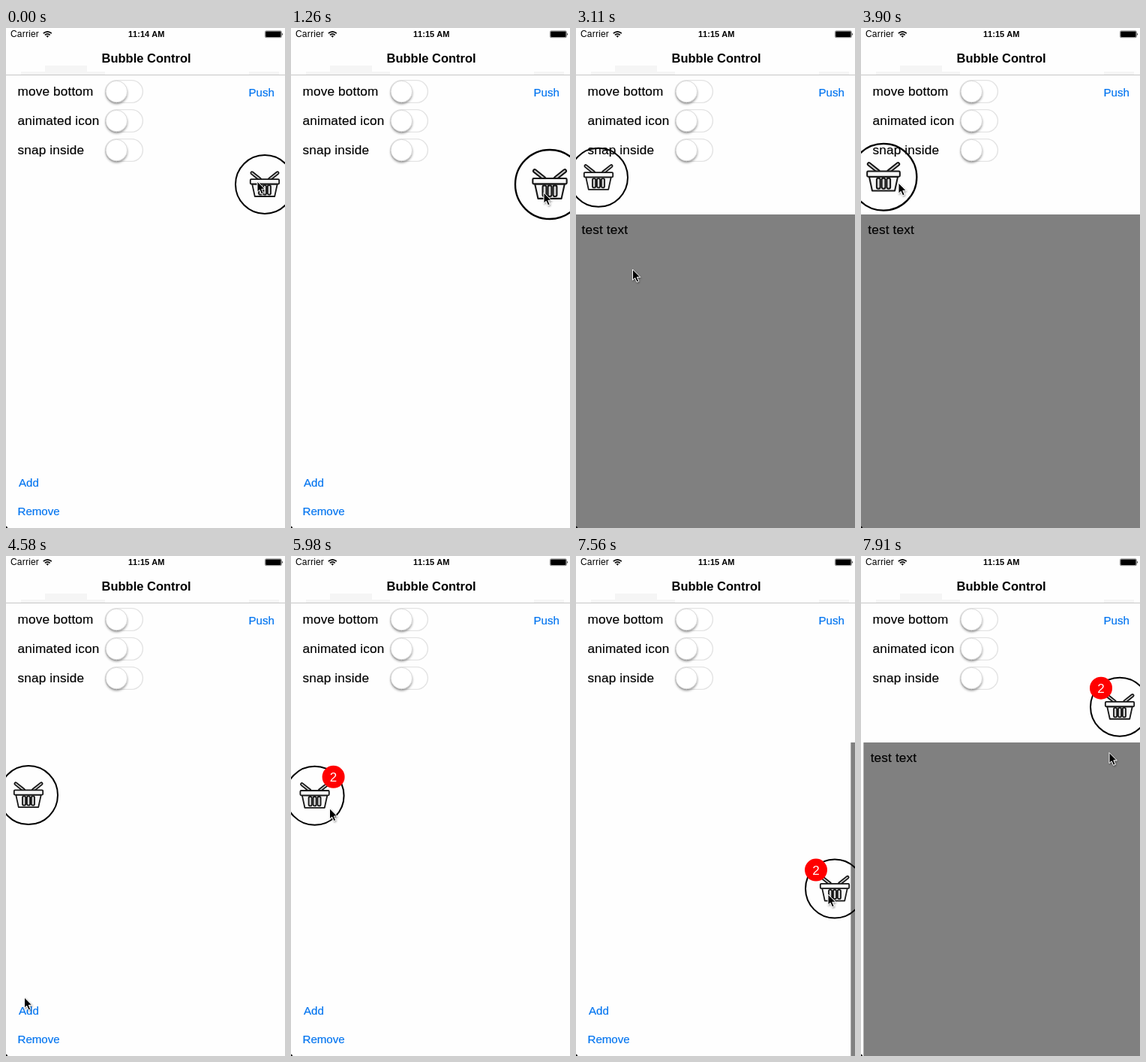
These frames come from a looping animation (372 by 665 pixels, 8000 ms). An HTML page:

```html
<!DOCTYPE html>
<html lang="en">
<head>
<meta charset="utf-8">
<title>Bubble Control</title>
<style>
html, body { margin: 0; width: 100%; height: 100%; overflow: hidden; background: #fefefe; }
svg { display: block; width: 372px; height: 665px; }
text { font-family: "Liberation Sans", Arial, sans-serif; font-kerning: none; white-space: pre; }
.label { font-size: 17.2px; letter-spacing: .15px; stroke: #000; stroke-width: .15px; }
.link { font-size: 15.1px; fill: #0074f0; stroke: #0074f0; stroke-width: .2px; }
.status { font-size: 12px; letter-spacing: .2px; }
.bold { font-weight: bold; }
</style>
</head>
<body>
<svg viewBox="0 0 372 665" xmlns="http://www.w3.org/2000/svg">
  <defs>
    <filter id="soft" x="-30%" y="-30%" width="160%" height="180%">
      <feDropShadow dx="0" dy="2.2" stdDeviation="1.6" flood-color="#000" flood-opacity=".4"/>
    </filter>
    <filter id="drop" x="-50%" y="-30%" width="220%" height="180%">
      <feDropShadow dx=".8" dy="1.4" stdDeviation=".9" flood-color="#000" flood-opacity=".4"/>
    </filter>
    <g id="switch">
      <rect x="132.6" y="-14.9" width="49.8" height="29.8" rx="14.9" fill="#fff" stroke="#e3e3e3" stroke-width="1.4"/>
      <circle cx="147.4" r="14.2" fill="#fff" stroke="#c4c4c4" stroke-width=".6" filter="url(#soft)"/>
    </g>
    <path id="sticks" d="M-17-15.2L-6.4-6.8M17-15.2L6.4-6.8" fill="none" stroke-linecap="round"/>
  </defs>

  <rect width="372" height="665" fill="#fefefe"/>
  <path d="M52 50H108V58H132V62H20V58H52ZM324 58H364V62H324Z" fill="#f5f5f5"/>
  <path d="M0 62.5H372" stroke="#c6c6c6"/>

  <text class="status" x="6" y="12.3">Carrier</text>
  <g fill="none" stroke="#000" stroke-width="1.7">
    <path d="M49.8 7.2Q55.3 2.4 60.8 7.2M51.9 9.3Q55.3 6.3 58.7 9.3"/>
    <path d="M53.4 10.6Q55.3 9.2 57.2 10.6L55.3 12.7Z" fill="#000" stroke="none"/>
  </g>
  <text id="clock" class="bold" x="163" y="12" font-size="11"></text>
  <rect x="345.4" y="3.9" width="22" height="8.8" rx="1.6" fill="#fff" stroke="#555" stroke-width=".7"/>
  <rect x="346.2" y="4.6" width="20.4" height="7.4" rx=".9"/>
  <path d="M368.2 6.5Q370 8.3 368.2 10.1Z"/>
  <text class="bold" x="127.5" y="46" font-size="16.5">Bubble Control</text>

  <text class="label" x="15.5" y="90">move bottom</text>
  <text class="label" x="15.5" y="128.5">animated icon</text>
  <text class="label" x="15.5" y="167.5">snap inside</text>
  <use href="#switch" y="84.5"/>
  <use href="#switch" y="123.5"/>
  <use href="#switch" y="162.5"/>

  <text class="link" x="323.5" y="90.5">Push</text>
  <text id="add" class="link" x="17" y="609.5">Add</text>
  <text class="link" x="15.5" y="647.5">Remove</text>

  <g id="panel">
    <rect y="248" width="374" height="417" fill="#808080"/>
    <text class="label" x="9.3" y="274">test text</text>
  </g>

  <g id="bubble">
    <circle r="39" fill="none" stroke="#000" stroke-width="2"/>
    <use href="#sticks" stroke="#161616" stroke-width="5"/>
    <use href="#sticks" stroke="#d0d0d0" stroke-width="1.5"/>
    <g fill="#f6f6f6" stroke="#161616" stroke-width="1.8" stroke-linejoin="round">
      <path d="M-16.8-.5L-13.2 16H13.2L16.8-.5Z"/>
      <rect x="-19.2" y="-6.8" width="38.4" height="6.3" rx="1.2"/>
      <g fill="#d8d8d8">
        <rect x="-8" y="1.2" width="4.2" height="12.4" rx="1.9"/>
        <rect x="-2.1" y="1.2" width="4.2" height="12.4" rx="1.9"/>
        <rect x="3.8" y="1.2" width="4.2" height="12.4" rx="1.9"/>
      </g>
    </g>
    <g id="badge">
      <circle r="15" fill="#f00"/>
      <text id="count" y="6" font-size="17" fill="#fff" text-anchor="middle"></text>
    </g>
  </g>

  <path d="M0 662.5Q2 663 2.2 665H0Z"/>
  <path id="cursor" d="M0 0V14.2L3.2 11.3L5.6 16.8L8.2 15.7L5.8 10.3H10.2Z" stroke="#fff" stroke-width="1" filter="url(#drop)"/>
</svg>
<script>
const LOOP = 8000;
const OPEN_LEFT = 2690, CLOSE_LEFT = 4050, OPEN_RIGHT = 7552;
const el = id => document.getElementById(id);
const [clock, add, panel, bubble, badge, count, cursor] =
  ["clock", "add", "panel", "bubble", "badge", "count", "cursor"].map(el);

const ramp = (t, a, b) => Math.min(1, Math.max(0, (t - a) / (b - a)));
const smooth = u => u * u * (3 - 2 * u);
const easeOut = u => 1 - (1 - u) * (1 - u);
const mix = (a, b, u) => a + (b - a) * u;
const pulse = (t, a, b, c, d) => ramp(t, a, b) - ramp(t, c, d);
const move = (node, x, y, s = 1) =>
  node.setAttribute("transform", `translate(${x.toFixed(2)} ${y.toFixed(2)}) scale(${s.toFixed(3)})`);

// Underdamped step response, damping ratio 0.6
function spring(t, start) {
  if (t <= start) return 0;
  const p = (t - start) * Math.PI / 180;
  return 1 - Math.exp(-.75 * p) * (Math.cos(p) + .75 * Math.sin(p));
}

// Pointer stops: time, x, y
const stops = [
  [200, 335, 204], [450, 337, 219], [1260, 337, 219], [1850, 182, 319],
  [2250, 62, 321.5], [2720, 62, 321.5], [3020, 75.5, 321], [3300, 75.5, 321],
  [3750, 50, 206], [4040, 50, 206], [4320, 48, 300], [4580, 24.5, 587],
  [4750, 29, 600], [5630, 29, 600], [5800, 50, 335], [5960, 50, 335],
  [6400, 272.5, 447], [6860, 272.5, 447], [7300, 336, 450], [7570, 336, 450],
  [7880, 331, 261.5]
];

function pointer(t) {
  const i = stops.findIndex(s => s[0] > t);
  if (i < 0) return stops[stops.length - 1].slice(1);
  if (i === 0) return stops[0].slice(1);
  const [a, x0, y0] = stops[i - 1], [b, x1, y1] = stops[i];
  const u = ramp(t, a, b), e = a === 1850 ? easeOut(u) : smooth(u);
  return [mix(x0, x1, e), mix(y0, y1, e)];
}

function bubbleAt(t) {
  let x, y;
  if (t < 5960) {
    const drag = smooth(ramp(t, 1260, 1850)), snap = easeOut(ramp(t, 1850, 2250));
    x = mix(mix(345, 190, drag), 30, snap);
    y = mix(mix(208, 308, drag), 318, snap);
    y -= 119.7 * (spring(t, OPEN_LEFT) - spring(t, CLOSE_LEFT));
  } else {
    const drag = smooth(ramp(t, 5960, 6400)), snap = easeOut(ramp(t, 6400, 6800));
    x = mix(mix(30, 270, drag), 345, snap);
    y = mix(mix(318, 437, drag), 447, snap) - 248.5 * spring(t, OPEN_RIGHT);
  }
  const s = 1 + .18 * (pulse(t, 1180, 1250, 1750, 1960) + pulse(t, 3840, 3920, 4000, 4100))
    + .1 * pulse(t, 6020, 6120, 6260, 6420);
  return [x, y, s];
}

function draw(t) {
  clock.textContent = t < 90 ? "11:14 AM" : "11:15 AM";
  add.setAttribute("opacity", 1 - .75 * (pulse(t, 4900, 4930, 5050, 5270) + pulse(t, 5420, 5450, 5560, 5780)));

  const left = spring(t, OPEN_LEFT) - spring(t, CLOSE_LEFT);
  move(panel, t < 5500 ? -374 * (1 - left) : 373 * (1 - spring(t, OPEN_RIGHT)), 0);

  const b = bubbleAt(t);
  move(bubble, ...b);
  count.textContent = t < 5570 ? "1" : "2";
  move(badge, b[0] > 186 ? -25 : 25, -25, smooth(ramp(t, 5030, 5150)));
  move(cursor, ...pointer(t));
}

const begin = performance.now();
function tick() {
  draw((performance.now() - begin) % LOOP);
  requestAnimationFrame(tick);
}
draw(0);
requestAnimationFrame(tick);
</script>
</body>
</html>
```
